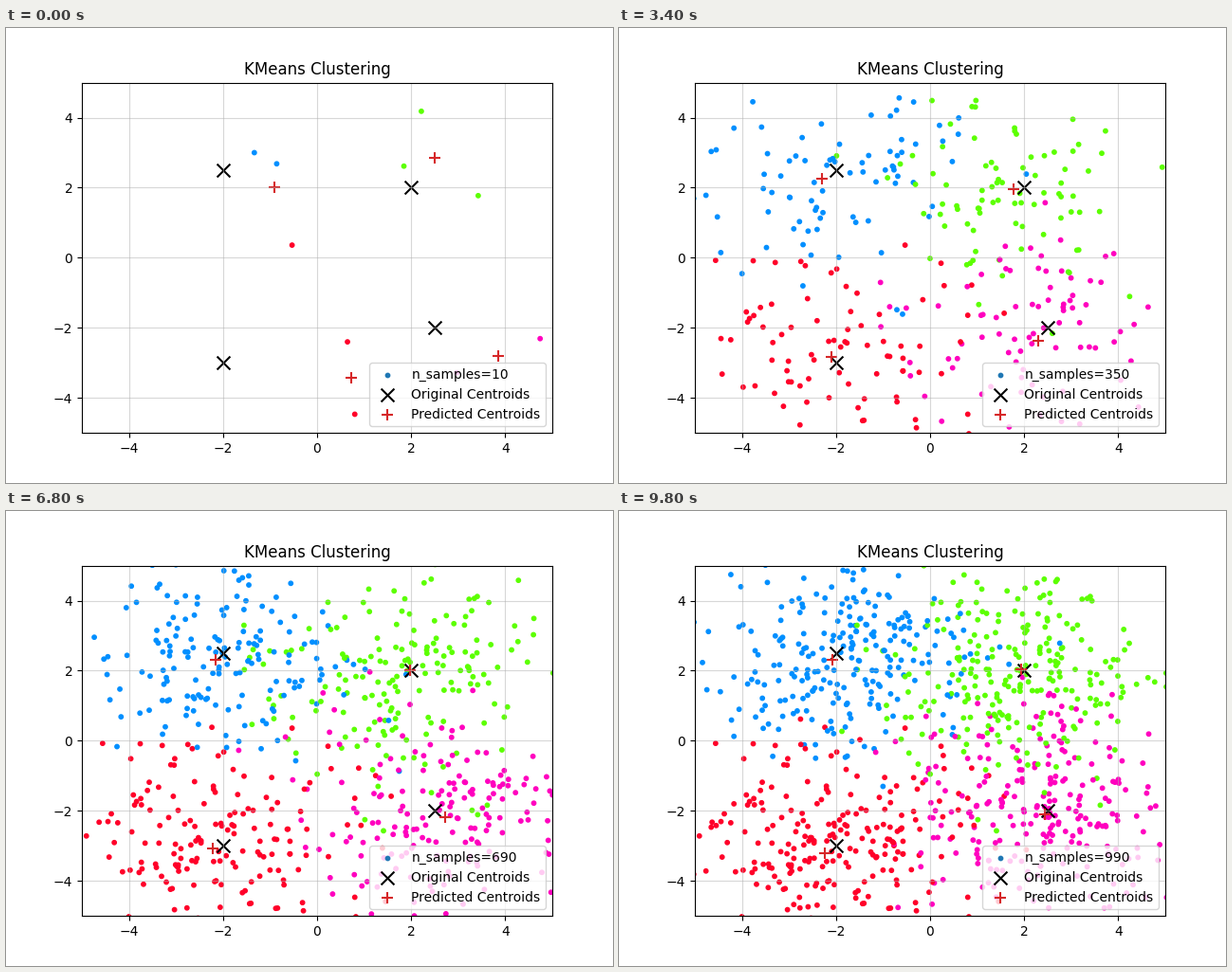
A matplotlib script for the animation above (10000 ms loop, 640 by 480 pixels).

```python
import numpy as np
import matplotlib.pyplot as plt
from matplotlib.animation import FuncAnimation

FRAMES, INTERVAL = 50, 200
CENTERS = np.array([[-2, -3], [2, 2], [-2, 2.5], [2.5, -2]])
SPREAD = 1.5
K = len(CENTERS)


def make_blobs(n):
    """Gaussian blobs around the centers, in shuffled order."""
    rng = np.random.RandomState(0)
    counts = [n // K + (i < n % K) for i in range(K)]
    points = np.vstack([rng.normal(c, SPREAD, (m, 2))
                        for c, m in zip(CENTERS, counts)])
    labels = np.repeat(np.arange(K), counts)
    order = np.arange(n)
    rng.shuffle(order)
    return points[order], labels[order]


def lloyd(points, means, max_iter=300):
    """Refine the means until they settle; return them with the inertia."""
    for _ in range(max_iter):
        dist = ((points[:, None] - means) ** 2).sum(axis=2)
        member = np.eye(K)[dist.argmin(axis=1)]
        size = member.sum(axis=0)[:, None]
        new = np.where(size > 0, member.T @ points / np.maximum(size, 1), means)
        if np.allclose(new, means, atol=1e-6):
            break
        means = new
    return means, dist.min(axis=1).sum()


def kmeans(points):
    """Best of several starts."""
    rng = np.random.RandomState(1)
    n = len(points)
    starts = [CENTERS] + [points[rng.choice(n, K, replace=False)]
                          for _ in range(max(6, 400 // n))]
    return min((lloyd(points, s) for s in starts), key=lambda r: r[1])[0]


fig, ax = plt.subplots(figsize=(6.4, 4.8), dpi=100)
ax.set_title("KMeans Clustering")
ax.set_xlim(-5, 5)
ax.set_ylim(-5, 5)
ax.grid(alpha=0.5)

samples = ax.scatter([], [], s=10, color="tab:blue", label="n_samples=10")
ax.scatter(*CENTERS.T, s=100, marker="x", color="black",
           label="Original Centroids")
predicted = ax.scatter([], [], s=80, marker="+", color="tab:red",
                       label="Predicted Centroids")
legend = ax.legend(loc="lower right")
count_text = legend.get_texts()[0]
colors = plt.get_cmap("gist_rainbow")(np.linspace(0, 1, K))


def update(frame):
    n = 10 + 20 * frame
    points, labels = make_blobs(n)
    samples.set_offsets(points)
    samples.set_color(colors[labels])
    predicted.set_offsets(kmeans(points))
    count_text.set_text(f"n_samples={n}")
    return samples, predicted, count_text


anim = FuncAnimation(fig, update, frames=FRAMES, interval=INTERVAL,
                     init_func=lambda: update(0), repeat=True, repeat_delay=0)
plt.show()
```
